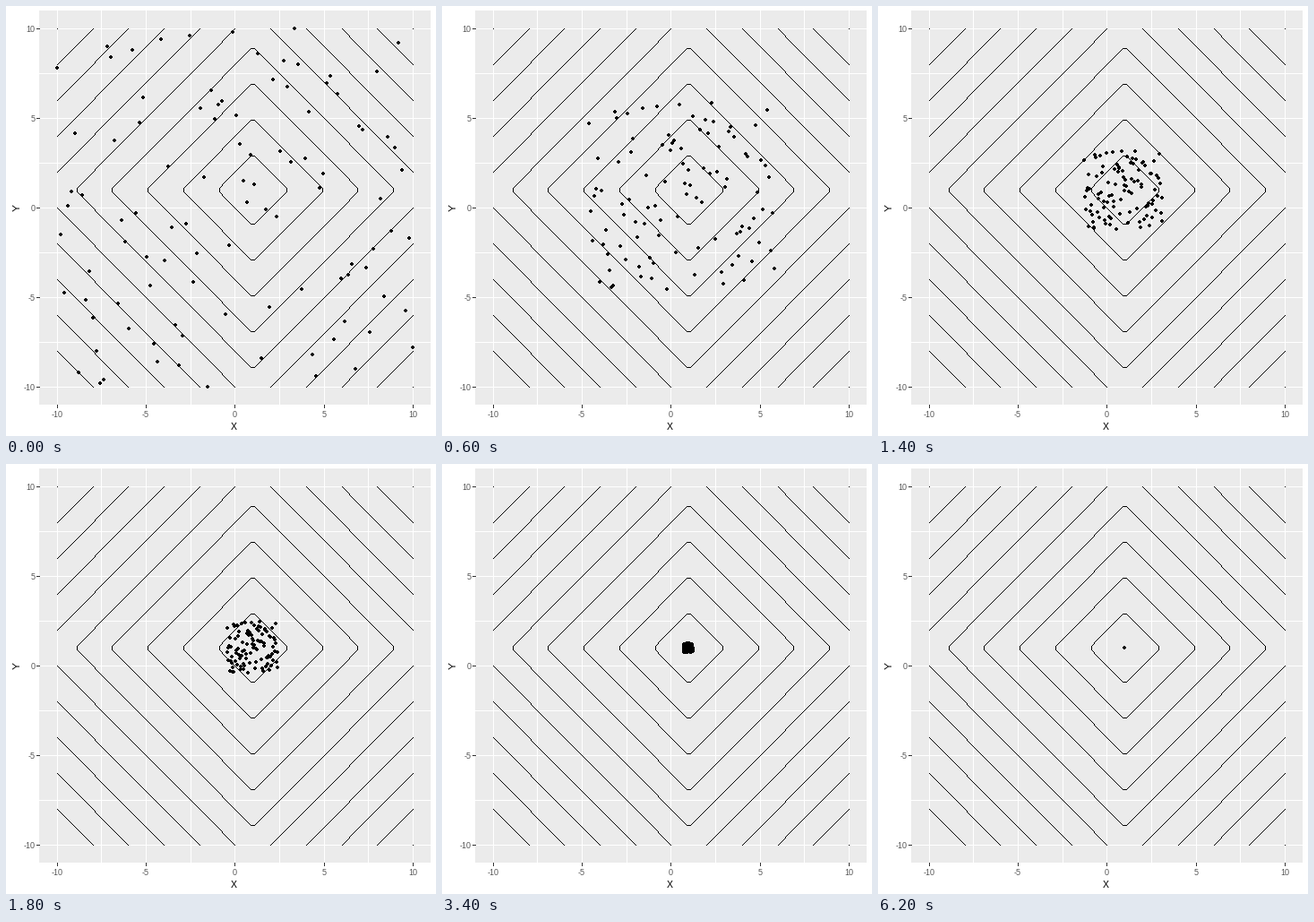
Recreate the animation shown at these times as a matplotlib script. Size 480 by 480 pixels, loop 10 s.

```python
import numpy as np
import matplotlib.pyplot as plt
from matplotlib.animation import FuncAnimation
from matplotlib.collections import PolyCollection
from matplotlib.patches import Rectangle

SIZE, DPI = 480, 80
PX = 72 / DPI  # one pixel in points
N = 100        # swarm size
BEST = 55      # column of the point the swarm gathers around
BEST_ROW = 56
SETTLE = 34    # frames until the best point reaches the minimum
FONT = "Liberation Sans"

plt.rcParams["text.hinting"] = "native"
plt.rcParams["text.hinting_factor"] = 1
fig = plt.figure(figsize=(SIZE / DPI, SIZE / DPI), dpi=DPI, facecolor="white")
ax = fig.add_axes([0, 0, 1, 1])


def to_x(v):
    return 56.8 + 19.86 * (np.asarray(v) + 10)


def to_y(v):
    return 425 - 20 * (np.asarray(v) + 10)


def line(xs, ys, color, z):
    ax.plot(xs, ys, color=color, lw=PX, antialiased=False, zorder=z,
            solid_capstyle="butt")


def label(x, y, s, size, color, **kw):
    ax.text(x, y, s, fontsize=size * PX, color=color, family=FONT,
            va="baseline", **kw)


def contour_mask():
    """One-pixel contours of |x - 1| + |y - 1| with slightly cut corners."""
    mask = np.zeros((SIZE, SIZE, 4))
    cut = 0.1
    rows = np.arange(25, 426)
    dy = np.maximum(abs((225 - rows) / 20 - 1), cut)
    for level in range(2, 21, 2):
        dx = level - dy
        for side in (-1, 1):
            x = 1 + side * dx
            on = (dx >= cut) & (abs(x) <= 10.001)
            mask[rows[on], np.round(to_x(x[on])).astype(int), 3] = 1
            cap = 1 + side * (level - cut)
            if abs(cap) <= 10:
                left, right = np.round(to_x([1 - cut, 1 + cut])).astype(int)
                mask[round(float(to_y(cap))), left:right + 1, 3] = 1
    return mask


# Panel, grid, ticks and labels
ax.add_patch(Rectangle((37, 5), 437, 440, fc="#EBEBEB", ec="none", zorder=0))
for v in np.arange(-10, 10.1, 2.5):
    x, y = round(float(to_x(v))), round(float(to_y(v)))
    line([x, x], [5, 445], "white", 1)
    line([37, 474], [y, y], "white", 1)
    if v % 5 == 0:
        line([x, x], [445, 448], "#333333", 2)
        line([34, 37], [y, y], "#333333", 2)
        label(x, 459, f"{v:.0f}", 9, "#4D4D4D", ha="center")
        label(32.5, y + 4, f"{v:.0f}", 9, "#4D4D4D", ha="right")
label(254.5, 473, "X", 11, "black", ha="center")
label(16, 225, "Y", 11, "black", ha="center", rotation=90,
      rotation_mode="anchor")
ax.imshow(contour_mask(), extent=(0, SIZE, SIZE, 0), aspect="auto",
          interpolation="nearest", zorder=3)

# Latin hypercube start: one point per column and per row
rank = np.random.default_rng(7).permutation(N)
other = np.flatnonzero(rank == BEST_ROW)[0]
rank[[BEST, other]] = rank[[other, BEST]]
grid = np.linspace(-10, 10, N)
start = np.column_stack([to_x(grid), to_y(grid[rank])])
home = np.array([275, 205])
offset = start - start[BEST]

# The left and lower sides close in a little faster
rate = np.where(offset * [1, -1] < 0, 0.895, 0.9)

DOT = np.array([(-2, -1), (-1, -1), (-1, -2), (1, -2), (1, -1), (2, -1),
                (2, 1), (1, 1), (1, 2), (-1, 2), (-1, 1), (-2, 1)])
dots = PolyCollection([DOT], facecolors="black", edgecolors="none",
                      linewidths=0, antialiaseds=False, zorder=4)
ax.add_collection(dots)
ax.set(xlim=(0, SIZE), ylim=(SIZE, 0))
ax.axis("off")


def swarm(i):
    u = min(i / SETTLE, 1)
    best = start[BEST] + (home - start[BEST]) * np.array([u ** 2, u])
    return best + offset * rate ** i


def draw(i):
    pos = np.round(swarm(i))
    dots.set_verts(pos[:, None, :] + DOT)
    return [dots]


anim = FuncAnimation(fig, draw, frames=100, interval=100, repeat=True,
                     init_func=lambda: draw(0), blit=False)
plt.show()
```
